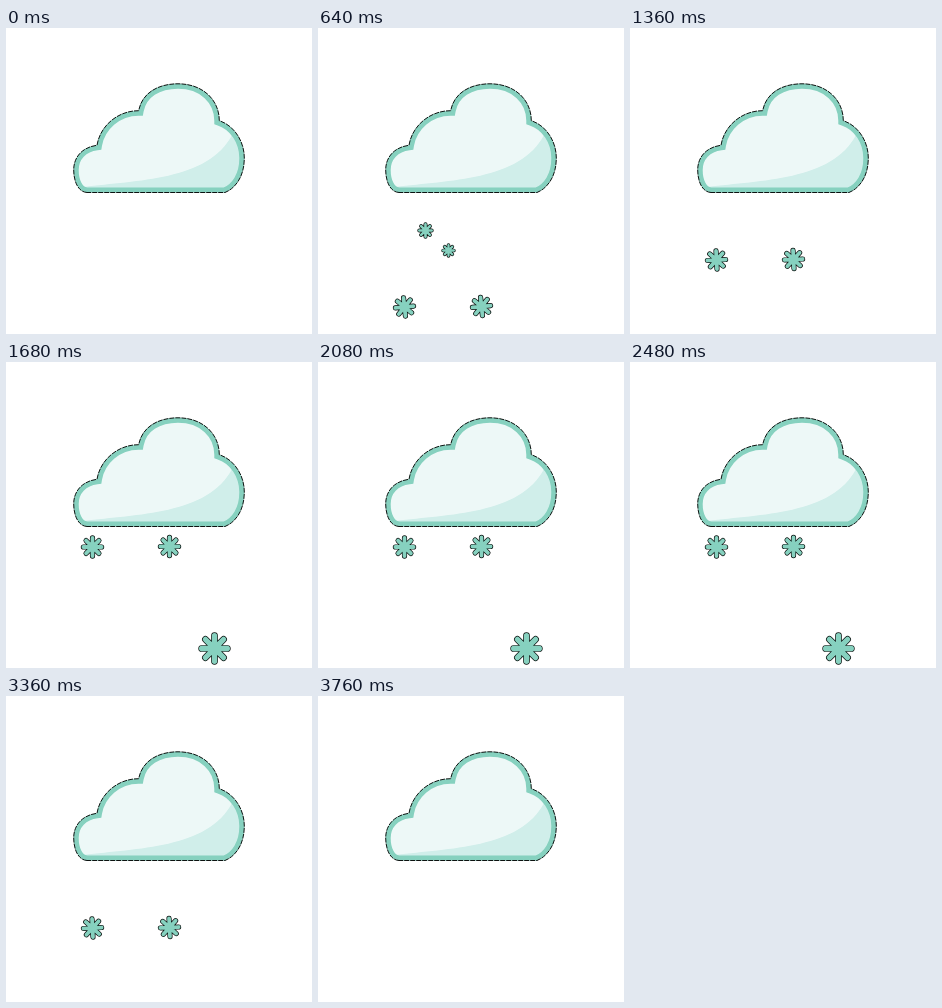
Animation, 306 px wide and 306 px high, one loop 4000 ms. Source, as an HTML page with a canvas:

```html
<!DOCTYPE html>
<html lang="en">
<head>
<meta charset="utf-8">
<title>Snow cloud</title>
<style>
  html, body { margin: 0; width: 100%; height: 100%; overflow: hidden; background: #fff; }
  canvas { display: block; }
</style>
</head>
<body>
<canvas id="stage" width="306" height="306"></canvas>
<script>
const ctx = document.getElementById('stage').getContext('2d');
const LOOP = 4000, STEP = 80, CYCLE = 5, FALL = 47, LAST = 47;
const TEAL = '#86d1bf', PALE = '#edf8f7', SHADE = '#d0eeea', EDGE = '#0c1210';

const cloud = new Path2D('M81 164.5C72 164 67.7 153 67.7 142C67.7 128.5 77 119 91 117.3' +
  'C94 98.5 111 82.7 132.7 82.7C136 65 152 55.8 172 55.8C197 55.8 213.3 72 213.3 92.7' +
  'C228 97.5 238.3 113 238.3 130C238.3 148 230 160 219 164.5Z');
const shade = new Path2D('M78 159C130 152 202 153 226 107L240 107V166H78Z');

// start: step of the cycle in which the flake leaves the cloud
const flakes = [
  { x: 86.5, y: 185, r: 11.5, start: 1, spin: -3 },
  { x: 163.5, y: 184.5, r: 11.5, start: 1, spin: -3 },
  { x: 107.5, y: 202.5, r: 8, start: 3, spin: 0 },
  { x: 130.5, y: 222.5, r: 7, start: 3, spin: 0 },
  { x: 208.5, y: 192.5, r: 16, start: 4, spin: 0 }
];

function drawCloud() {
  ctx.save();
  ctx.clip(cloud);
  ctx.fillStyle = PALE;
  ctx.fill(cloud);
  ctx.fillStyle = SHADE;
  ctx.fill(shade);
  ctx.strokeStyle = TEAL;
  ctx.lineWidth = 10;
  ctx.stroke(cloud);
  ctx.restore();

  ctx.save();
  ctx.strokeStyle = EDGE;
  ctx.lineWidth = 1;
  ctx.setLineDash([5, 1]);
  ctx.stroke(cloud);
  ctx.restore();
}

function drawFlake({ x, y, r, spin }, age) {
  const width = r * 0.33, reach = r - width / 2 - 0.5;
  ctx.save();
  ctx.translate(x, y + age * FALL);
  ctx.rotate(age * spin * Math.PI / 180);
  ctx.lineCap = 'round';
  ctx.beginPath();
  for (let i = 0; i < 4; i++) {
    const a = i * Math.PI / 4, dx = reach * Math.cos(a), dy = reach * Math.sin(a);
    ctx.moveTo(-dx, -dy);
    ctx.lineTo(dx, dy);
  }
  for (const [color, w] of [[EDGE, width + 1.4], [TEAL, width]]) {
    ctx.strokeStyle = color;
    ctx.lineWidth = w;
    ctx.stroke();
  }
  ctx.restore();
}

function draw() {
  const step = Math.floor(performance.now() % LOOP / STEP);
  ctx.fillStyle = '#fff';
  ctx.fillRect(0, 0, 306, 306);
  if (step > 0 && step < LAST) {
    for (const flake of flakes) {
      const age = (step - flake.start + CYCLE) % CYCLE;
      if (age < 3) drawFlake(flake, age);
    }
  }
  drawCloud();
  requestAnimationFrame(draw);
}
draw();
</script>
</body>
</html>
```
